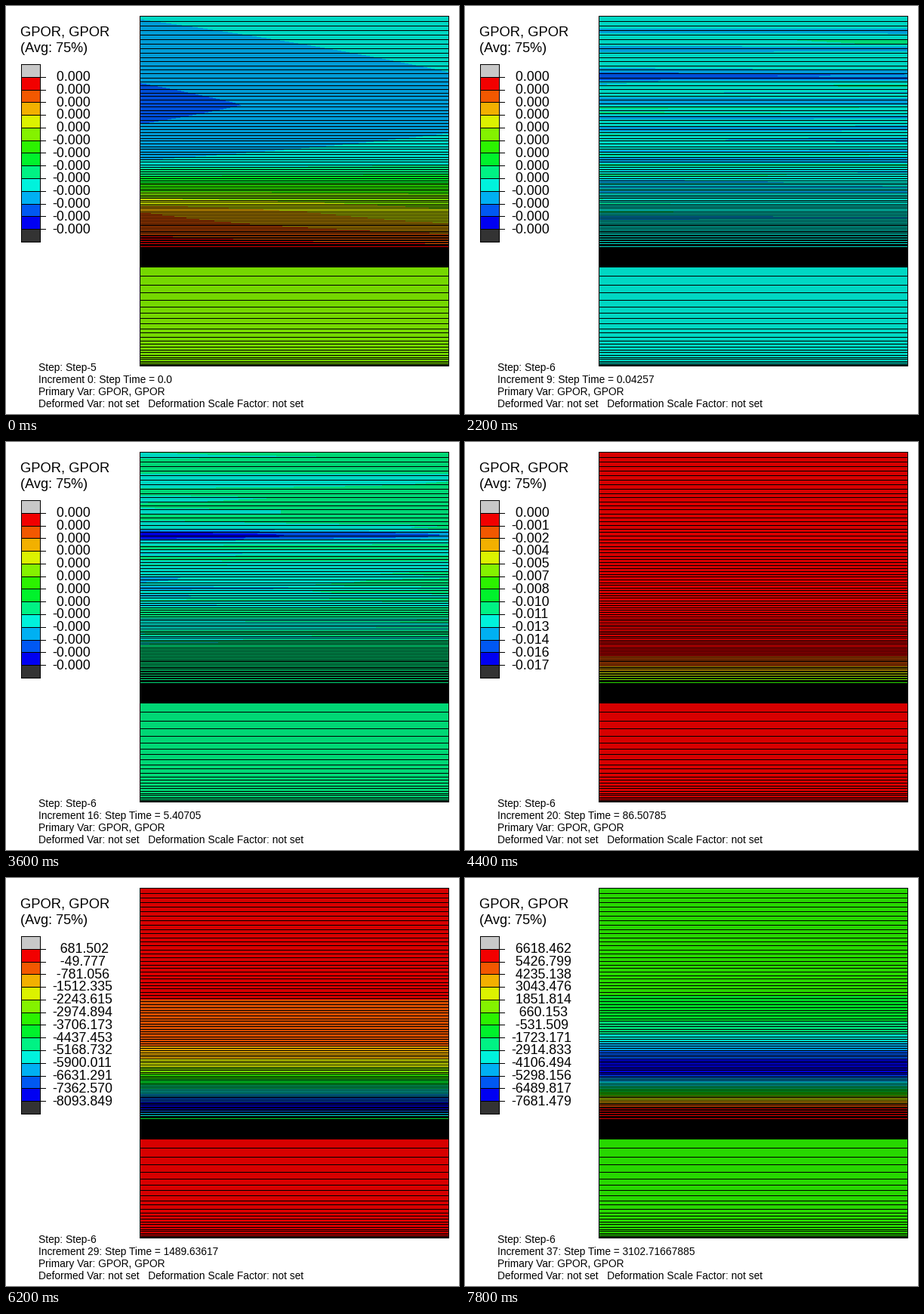
These frames come from a looping animation (600 px wide and 540 px high, 8000 ms). A matplotlib script:

```python
import numpy as np
import matplotlib.pyplot as plt
from matplotlib.animation import FuncAnimation

W, H, DPI = 600, 540, 100
FRAMES, INTERVAL = 40, 200
LEFT, RIGHT, TOP, BOTTOM = 177, 587, 13, 477
SOLID_TOP, SOLID_END = 320, 345


def rainbow(n=12):
    """Red to blue in even steps through yellow, green and cyan."""
    h = np.linspace(0, 4, n)
    rgb = [np.clip(2 - h, 0, 1), np.clip(h, 0, 1) * np.clip(4 - h, 0, 1),
           np.clip(h - 2, 0, 1)]
    return np.stack(rgb, axis=1) * 255


PALETTE = rainbow()
SHADED = (PALETTE * 0.845).astype(np.uint8)

rows = np.arange(TOP, BOTTOM)
across = np.linspace(0, 1, RIGHT - LEFT)


def graded(start, step, ratio, end):
    """Mesh lines whose spacing shrinks by a fixed ratio."""
    ys, y = [], start
    while y < end:
        ys.append(y)
        y, step = y + step, step * ratio
    return np.array(ys)


upper = graded(TOP, 6.5, 0.9831, SOLID_TOP)
lower = graded(SOLID_END, 12.4, 0.919, BOTTOM)
is_line = np.isin(rows, np.round(np.r_[upper, lower]).astype(int))
is_line |= (rows >= SOLID_TOP) & (rows < SOLID_END)
is_line |= rows >= 474


def bump(center, above, below, power=1.4):
    d = rows - center
    return np.exp(-np.abs(d / np.where(d < 0, above, below)) ** power)


def curve(*points):
    return np.interp(rows, *zip(*points))


def sides(left, right=None):
    return np.stack([left, left if right is None else right])


fade = curve((230, 1), (320, 0))
calm = np.zeros(len(rows))

# Each shape is an offset, in colour bands, from the band that holds zero.
sloped = sides(
    curve((13, 8.95), (131, 10.35), (156, 10), (204, 9), (245, 5), (272, 2),
          (303, 1), (320, .3)),
    curve((13, 8.3), (87, 9), (128, 9.3), (168, 9), (204, 8.45), (245, 5.2),
          (283, 3.3), (320, .6))) - 4.5
streaks = sides(-2.2 * bump(115, 3, 3), -2 * bump(115, 3, 3)
                - 2.5 * bump(155, 2, 2))
ripples = sides(2 * bump(96, 4, 3) - 2 * bump(105, 2, 2) + 1.6 * bump(124, 4, 4)
                + .2 * fade)
wedges = sides(4 * bump(123, 7, 6, 3) + 1.3 * bump(190, 16, 12) + .7 * fade,
               2.2 * bump(123, 6, 5, 3) + .4 * fade)
drying = sides(5.7 * np.clip((rows - 262) / 58, 0, 1) ** 2.2)
front = sides(11 * bump(304, 45, 18))
trough = sides(6.6 * bump(253, 48, 24) - 5.4 / (1 + np.exp((290 - rows) / 6)))

# frame, highest label, lowest label, shape, streak strength
KEYS = [
    (0, 4.5e-6, -7.5e-6, sloped, calm),
    (2, 4.5e-6, -7.5e-6, sloped, calm),
    (7, 10.5e-6, -1.5e-6, streaks, fade * (.15 + .7 * bump(145, 35, 35, 3))),
    (11, 8.5e-6, -3.5e-6, ripples, fade * .75),
    (18, 7.5e-6, -4.5e-6, wedges, fade * .5),
    (22, .00049, -.01715, drying, calm),
    (31, 681.5024, -8093.84944, front, calm),
    (39, 6618.46151, -7681.47955, trough, calm)]


def lerp(a, b, t):
    return a + (b - a) * t


def state(i):
    """Label range and band offsets for one frame."""
    n = max(j for j in range(len(KEYS) - 1) if KEYS[j][0] <= i)
    a, b = KEYS[n], KEYS[n + 1]
    t = (i - a[0]) / (b[0] - a[0])
    if n < len(KEYS) - 2:
        hi = a[1] ** (1 - t) * b[1] ** t
        lo = -((-a[2]) ** (1 - t) * (-b[2]) ** t)
    else:
        hi, lo = lerp(a[1], b[1], t), lerp(a[2], b[2], t)
    rng = np.random.default_rng(40 + i)
    common, own = rng.normal(size=upper.size), rng.normal(size=(2, upper.size))
    noise = [np.interp(rows, upper, (common + .4 * o) * gain)
             for o, gain in zip(own, (1, .7))]
    return hi, lo, lerp(a[3], b[3], t) + lerp(a[4], b[4], t) * noise


def field(hi, lo, shape):
    zero = 12 * hi / (hi - lo)
    left, right = shape[:, :, None]
    bands = zero + lerp(left, right, across)
    bands[rows >= SOLID_TOP] = zero
    img = SHADED[np.clip(bands, 0, 11.99).astype(int)]
    img[is_line] = 0
    img[:, [0, -1]] = 0
    img[[0, -1]] = 0
    return img


def labels(hi, lo):
    vals = np.linspace(hi, lo, 13)
    # lower levels are cut to single precision
    ulp = np.spacing(np.abs(vals).astype(np.float32)).astype(float)
    vals[1:] = (np.trunc(vals / ulp) * ulp)[1:]
    text = [f"{v:.3f}" for v in vals]
    width = max(map(len, text))
    return [s.rjust(width) for s in text]


def step_times():
    """Doubling increments, then two nearly even stretches."""
    times = [0.0]
    for n in range(1, 23):
        times.append(times[-1] + 0.00033 * 2 ** max(0, n - 3))
    times += list(np.interp(range(23, 38), (22, 29, 37),
                            (times[22], 1489.63617, 3102.71667885)))
    return [round(float(t), 5 if n < 30 else 8) for n, t in enumerate(times)]


TIMES = step_times()


def caption(i):
    if i < 2:
        return "Step: Step-5", f"Increment {i}: Step Time = {float(i)}"
    return "Step: Step-6", f"Increment {i - 2}: Step Time = {TIMES[i - 2]}"


def backdrop():
    img = np.full((H, W, 3), 255, np.uint8)
    edges = np.round(np.linspace(77, 312, 15)).astype(int)
    fills = [(200,) * 3, *(PALETTE * 0.95).astype(int), (51,) * 3]
    for y0, y1, c in zip(edges, edges[1:], fills):
        img[y0:y1, 20:46] = c
    img[edges, 20:46] = 0
    img[edges[1:-1], 46:53] = 0
    img[edges[0]:edges[-1] + 1, [20, 45]] = 0
    return img


fig = plt.figure(figsize=(W / DPI, H / DPI), dpi=DPI, facecolor="white")
ax = fig.add_axes((0, 0, 1, 1))
ax.axis("off")
canvas = backdrop()
picture = ax.imshow(canvas, extent=(0, W, H, 0), interpolation="nearest",
                    aspect="auto")
ax.set_xlim(0, W)
ax.set_ylim(H, 0)


def write(x, y, px, text=""):
    return ax.text(x, y, text, family="Liberation Sans", fontsize=px * 72 / DPI,
                   color="black", va="baseline", ha="left")


write(19, 40, 18.4, "GPOR, GPOR")
write(19, 61, 18.2, "(Avg: 75%)")
notes = [write(43, 483 + 16 * k, 13.75) for k in range(4)]
notes[2].set_text("Primary Var: GPOR, GPOR")
notes[3].set_text("Deformed Var: not set   Deformation Scale Factor: not set")
levels = [write(61.5, 99 + 16.8 * k, 17.8) for k in range(13)]


def draw(i):
    hi, lo, shape = state(i)
    canvas[TOP:BOTTOM, LEFT:RIGHT] = field(hi, lo, shape)
    picture.set_data(canvas.copy())
    for item, text in zip(levels + notes[:2], [*labels(hi, lo), *caption(i)]):
        item.set_text(text)
    return [picture, *notes, *levels]


anim = FuncAnimation(fig, draw, frames=FRAMES, interval=INTERVAL, repeat=True,
                     repeat_delay=0, blit=False)
plt.show()
```
